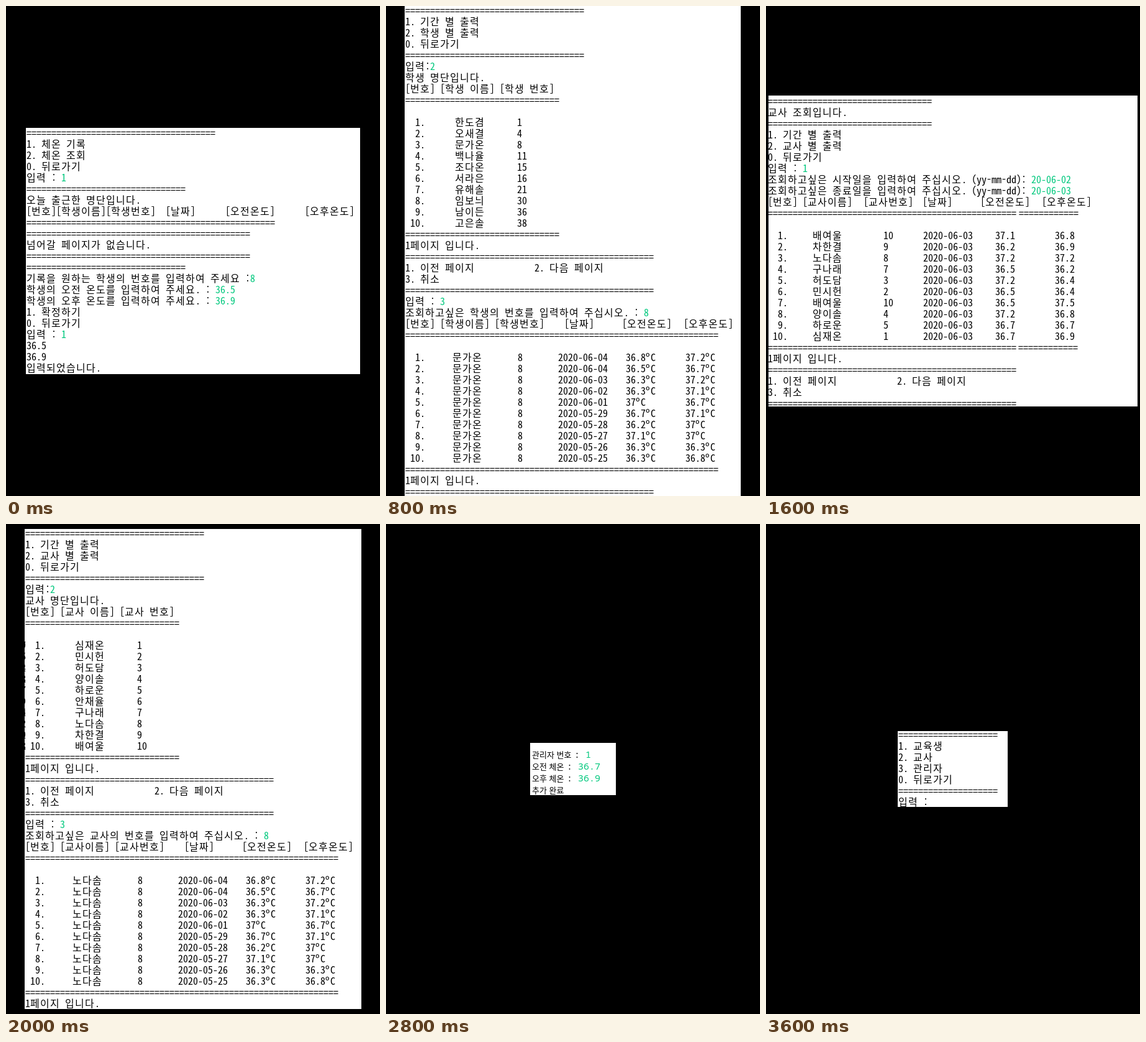
An HTML page that plays this animation: 602x788 px, repeating every 4000 ms.

```html
<!DOCTYPE html>
<html lang="ko">
<head>
<meta charset="utf-8">
<title>체온 관리 콘솔</title>
<style>
  html, body { margin: 0; width: 100%; height: 100%; overflow: hidden; background: #000; }
  #stage { display: block; width: 602px; height: 788px; background: #000; }
  #stage svg { overflow: hidden; }
  text { fill: #000; }
  .cell { font: 16px "Noto Sans Mono CJK KR", "Noto Sans CJK KR", "Noto Sans CJK JP", "Noto Sans Mono", monospace; }
  .label { font: 13px "Noto Sans CJK KR", "Noto Sans CJK JP", "Noto Sans", sans-serif; }
  .value { font: 15px "Noto Sans Mono", "DejaVu Sans Mono", monospace; }
  .input { fill: #00c87d; }
</style>
</head>
<body>
<svg id="stage" viewBox="0 0 602 788"></svg>
<script>
const CELL = 8, ROW = 18, HOLD = 400;
const stage = document.getElementById('stage');

function add(parent, tag, attrs, content = '') {
  const node = document.createElementNS('http://www.w3.org/2000/svg', tag);
  for (const key in attrs) node.setAttribute(key, attrs[key]);
  node.textContent = content;
  return parent.appendChild(node);
}

const cells = ch => /[\u1100-\u11ff\u3000-\ud7af]/.test(ch) ? 2 : 1;

// Text on the console grid; parts in braces are typed input.
function print(panel, x, y, str) {
  str.split(/[{}]/).forEach((part, i) => {
    for (const word of part.split(/( +)/)) {
      const xs = [];
      for (const ch of word) { xs.push(x); x += CELL * cells(ch); }
      if (word.trim()) add(panel, 'text', { class: i % 2 ? 'cell input' : 'cell', x: xs.join(' '), y }, word);
    }
  });
}

function makePanel(left, top, right, bottom) {
  const width = right - left, height = bottom - top;
  const panel = add(stage, 'svg', {
    x: left, y: top, width, height, viewBox: `${left} ${top} ${width} ${height}`, visibility: 'hidden'
  });
  add(panel, 'rect', { x: left, y: top, width, height, fill: '#fff' });
  return panel;
}

// A line is a string, or a list of [x, string] pairs; y is the middle of the first row.
function consolePanel(box, x, y, lines) {
  const panel = makePanel(...box);
  lines.forEach((line, i) => {
    const parts = typeof line === 'string' ? [[x, line]] : line;
    for (const [px, str] of parts) print(panel, px, y + 6 + i * ROW, str);
  });
  return panel;
}

const bar = n => '='.repeat(n);
const columns = (xs, values) => values.map((v, i) => [xs[i], String(v)]);

// First entry of xs is the right edge of the running number.
const table = (xs, rows) => rows.map((row, i) => {
  const no = `${i + 1}.`;
  return [[xs[0] - no.length * CELL, no], ...columns(xs.slice(1), row)];
});

const pager = ['1페이지 입니다.', bar(50), '1. 이전 페이지            2. 다음 페이지', '3. 취소', bar(50)];
const recordMenu = ['1. 체온 기록', '2. 체온 조회', '0. 뒤로가기'];
const outputMenu = who => ['1. 기간 별 출력', `2. ${who} 별 출력`, '0. 뒤로가기'];
const roleMenu = [bar(20), '1. 교육생', '2. 교사', '3. 관리자', '0. 뒤로가기', bar(20)];

const students = [
  '한도겸 1', '오새결 4', '문가온 8', '백나율 11', '조다온 15',
  '서라은 16', '유해솔 21', '임보늬 30', '남이든 36', '고은솔 38'
].map(s => s.split(' '));

// Entry 0 is a second reading of teacher 10.
const teachers = [
  '배여울 10 36.5 37.5', '심재온 1 36.7 36.9', '민시헌 2 36.5 36.4', '허도담 3 37.2 36.4',
  '양이솔 4 37.2 36.8', '하로운 5 36.7 36.7', '안채율 6 37 36.9', '구나래 7 36.5 36.2',
  '노다솜 8 37.2 37.2', '차한결 9 36.2 36.9', '배여울 10 37.1 36.8'
].map(s => s.split(' '));

const readings = [
  '06-04 36.8 37.2', '06-04 36.5 36.7', '06-03 36.3 37.2', '06-02 36.3 37.1', '06-01 37 36.7',
  '05-29 36.7 37.1', '05-28 36.2 37', '05-27 37.1 37', '05-26 36.3 36.3', '05-25 36.3 36.8'
].map(s => s.split(' '));

const today = '2020-06-03';
const dated = ([name, id, am, pm]) => [name, id, today, am, pm];
const periodOrder = [10, 9, 8, 7, 3, 2, 0, 4, 5, 1];
const recentOrder = [7, 6, 8, 5, 4, 3, 2, 1, 10, 0];

function periodReport(who, x, rows) {
  const at = list => list.map(v => x + v);
  const rule = join => [[x, bar(50)], [x + join, bar(12)]];
  return [
    ...outputMenu(who),
    '입력 : {1}',
    '조회하고싶은 시작일을 입력하여 주십시오. (yy-mm-dd): {20-06-02}',
    '조회하고싶은 종료일을 입력하여 주십시오. (yy-mm-dd): {20-06-03}',
    columns(at([0, 56, 154, 249, 342, 441]),
      ['[번호]', `[${who}이름]`, `[${who}번호]`, '[날짜]', '[오전온도]', '[오후온도]']),
    rule(404), '',
    ...table(at([32, 72, 186, 250, 366, 462]), rows),
    rule(403), ...pager
  ];
}

function personReport(who, x, people, [name, id]) {
  const at = list => list.map(v => x + v);
  return [
    bar(36), ...outputMenu(who), bar(36),
    '입력:{2}',
    `${who} 명단입니다.`,
    `[번호] [${who} 이름] [${who} 번호]`,
    bar(31), '',
    ...table(at([32, 80, 180]), people),
    bar(31), ...pager,
    '입력 : {3}',
    `조회하고싶은 ${who}의 번호를 입력하여 주십시오. : {${id}}`,
    columns(at([0, 56, 144, 256, 349, 448]),
      ['[번호]', `[${who}이름]`, `[${who}번호]`, '[날짜]', '[오전온도]', '[오후온도]']),
    bar(63), '',
    ...table(at([32, 76, 181, 246, 355, 451]),
      readings.map(([day, am, pm]) => [name, id, `2020-${day}`, `${am}ºC`, `${pm}ºC`])),
    bar(63), ...pager.slice(0, 2)
  ];
}

function recordDonePanel() {
  const panel = makePanel(232, 352, 370, 436);
  const rows = [['관리자 번호', 303, '1'], ['오전 체온', 291, '36.7'], ['오후 체온', 291, '36.9'], ['추가 완료']];
  rows.forEach(([label, x, value], i) => {
    const y = 376 + i * 19;
    add(panel, 'text', { class: 'label', x: 235, y }, label);
    if (!value) return;
    add(panel, 'text', { class: 'value', x, y }, ':');
    add(panel, 'text', { class: 'value input', x: x + 18, y }, value);
  });
  return panel;
}

const scenes = [
  consolePanel([32, 196, 570, 592], 33, 204, [
    bar(38), ...recordMenu, '입력 : {1}', bar(32),
    '오늘 출근한 명단입니다.',
    '[번호][학생이름][학생번호]  [날짜]      [오전온도]      [오후온도]',
    bar(50), bar(45), '넘어갈 페이지가 없습니다.', bar(45), bar(32),
    '기록을 원하는 학생의 번호를 입력하여 주세요 :{8}',
    '학생의 오전 온도를 입력하여 주세요. : {36.5}',
    '학생의 오후 온도를 입력하여 주세요. : {36.9}',
    '1. 확정하기', '0. 뒤로가기', '입력 : {1}', '36.5', '36.9', '입력되었습니다.'
  ]),
  consolePanel([0, 84, 602, 703], 1, 93, [
    bar(38), ...recordMenu, '입력 : {2}', bar(36),
    ...periodReport('학생', 1, students.map(([name, id], i) => [name, id, today, ...readings[i].slice(1)])),
    '입력 : {3}', bar(50)
  ]),
  consolePanel([30, 0, 571, 788], 31, 7, personReport('학생', 31, students, students[2])),
  consolePanel([187, 301, 415, 487], 187, 314, [
    ...recordMenu, bar(24), '번호 : {1}', '',
    '교사 번호 : {1}', '오전 체온 : {36.7}', '오후 체온 : {37.1}', '추가 완료'
  ]),
  consolePanel([4, 144, 598, 644], 3, 153, [
    bar(33), '교사 조회입니다.', bar(33),
    ...periodReport('교사', 3, periodOrder.map(i => dated(teachers[i])))
  ]),
  consolePanel([30, 8, 572, 780], 31, 15,
    personReport('교사', 31, teachers.slice(1), teachers[8]).slice(0, 43)),
  consolePanel([17, 135, 584, 653], 17, 142, [
    ...roleMenu, '입력 : {2}',
    `${bar(26)}교사 체온${bar(26)}`,
    '[교사명]        [교사번호]      [날짜]        [오전]  [오후]',
    bar(60), '',
    ...table([49, 57, 181, 265, 393, 457], recentOrder.map(i => dated(teachers[i]))),
    bar(60), ...pager, '입력 : {3}', bar(50)
  ]),
  recordDonePanel(),
  consolePanel([78, 219, 524, 568], 79, 226, [
    ...roleMenu, '입력 : {3}',
    `${bar(21)}관리자 체온${bar(21)}`,
    '[관리자명]    [관리자번호]   [날짜]     [오전]  [오후]',
    bar(54), '',
    ...table([111, 119, 231, 303, 399, 463], [['도하람', 1, today, '36.7', '36.9'], ['류이음', 2, today, '36.5', '36.8']]),
    bar(54), ...pager
  ]),
  consolePanel([212, 333, 389, 455], 213, 339, [...roleMenu, '입력 :'])
];

function render(time) {
  const current = Math.floor(time / HOLD) % scenes.length;
  scenes.forEach((scene, i) => scene.setAttribute('visibility', i === current ? 'visible' : 'hidden'));
}

function tick(now) {
  render(now);
  requestAnimationFrame(tick);
}
render(0);
requestAnimationFrame(tick);
</script>
</body>
</html>
```
